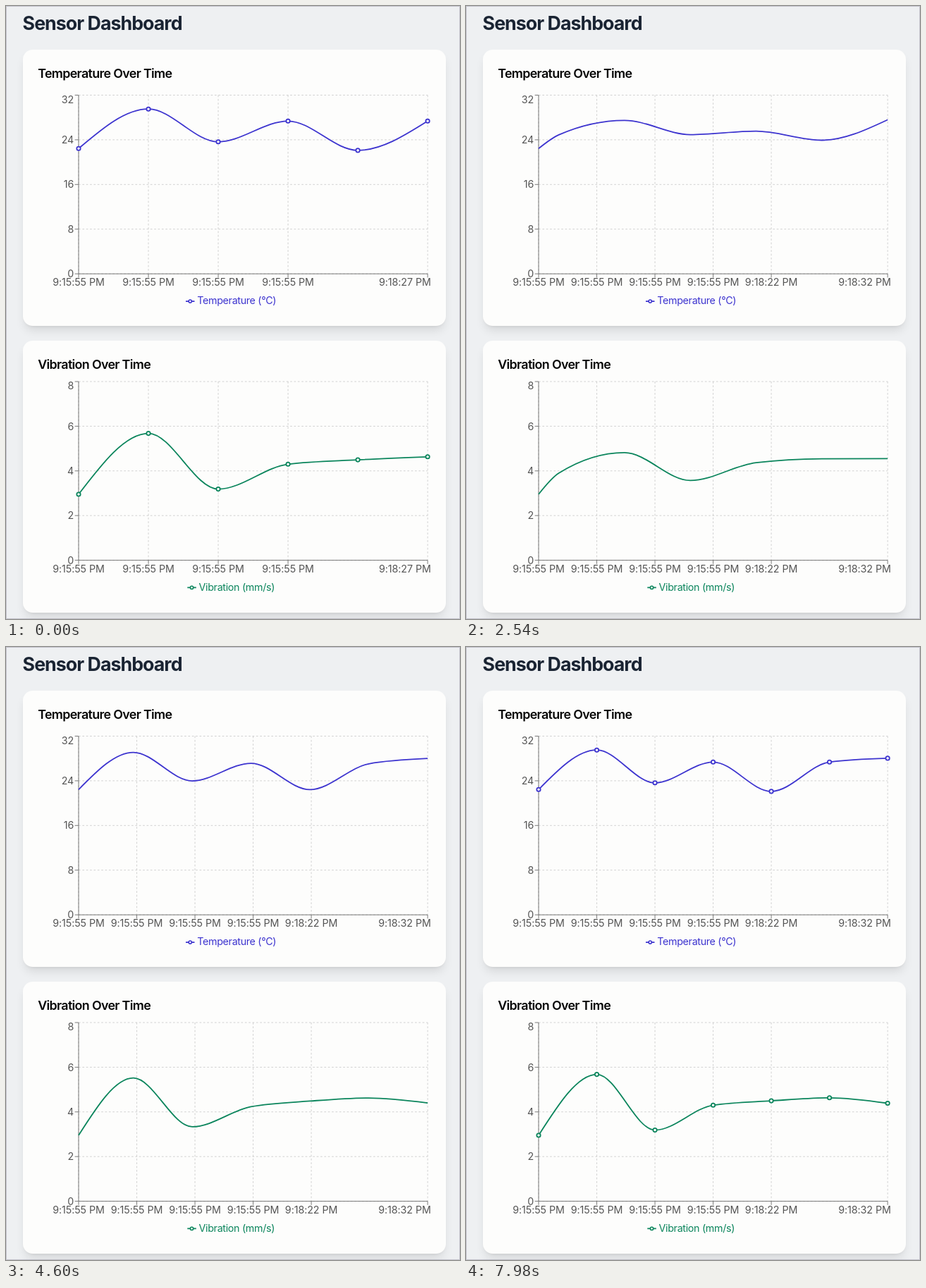
Animation of 644 by 870 pixels, one loop 8000 ms. Source, as an HTML page:

```html
<!DOCTYPE html>
<html lang="en">
<head>
<meta charset="utf-8">
<title>Sensor Dashboard</title>
<style>
html, body { margin: 0; width: 100%; height: 100%; overflow: hidden; background: #eef0f2; }
.card {
  position: absolute; left: 24px; width: 600px; border-radius: 14px; background: #fdfdfc;
  box-shadow: 0 9px 13.4px -2.7px rgba(0,0,0,.1), 0 3.6px 5.4px -3.6px rgba(0,0,0,.1);
}
.edge { position: absolute; left: 0; top: 0; width: 642px; height: 868px; border: 1px solid #c3c3cc; }
svg { position: absolute; left: 0; top: 0; }
text { font-family: Inter, "Open Sans", sans-serif; font-optical-sizing: none; }
.heading { font-size: 26.76px; font-weight: 700; letter-spacing: -.036em; fill: #1a2433; }
.title { font-size: 17.84px; font-weight: 600; letter-spacing: -.036em; fill: #050505; }
.label { font-size: 14.27px; letter-spacing: -.005em; fill: #555; }
.legend { font-size: 14.27px; letter-spacing: -.022em; }
.grid { stroke: #ccc; stroke-width: .9; stroke-dasharray: 2.68 2.68; }
.axis { stroke: #6b6b6b; stroke-width: .9; }
.curve { fill: none; stroke-width: 1.78; }
.dot { fill: #fff; stroke-width: 1.78; }
</style>
</head>
<body>
<div class="edge"></div>
<div class="card" style="top:62px;height:392px"></div>
<div class="card" style="top:475px;height:386px"></div>
<svg id="stage" width="644" height="870" viewBox="0 0 644 870"></svg>
<script>
const LOOP = 8000;
const LEFT = 103, RIGHT = 598.1, HEIGHT = 253.6;
const UPDATE_STEP = 36, TWEEN_STEPS = 90;

const BEFORE = { count: 6, times: ['9:15:55', '9:15:55', '9:15:55', '9:15:55', null, '9:18:27'] };
const AFTER = { count: 7, times: ['9:15:55', '9:15:55', '9:15:55', '9:15:55', '9:18:22', null, '9:18:32'] };

const CHARTS = [
  { title: 'Temperature Over Time', titleY: 101.5, top: 126.5, max: 32, color: '#3d34cf',
    legend: 'Temperature (°C)', legendX: 255, legendY: 423.3,
    ys: [202.3, 146.2, 192.8, 163.3, 204.9, 163.3, 157.9] },
  { title: 'Vibration Over Time', titleY: 514.8, top: 533, max: 8, color: '#0b855c',
    legend: 'Vibration (mm/s)', legendX: 257.3, legendY: 829.6,
    ys: [693, 606.6, 685.6, 650.3, 644.1, 639.8, 647.5] }
];

function add(parent, tag, attrs, content) {
  const el = document.createElementNS('http://www.w3.org/2000/svg', tag);
  for (const key in attrs) el.setAttribute(key, attrs[key]);
  if (content !== undefined) el.textContent = content;
  parent.appendChild(el);
  return el;
}

const line = (parent, cls, x1, y1, x2, y2) => add(parent, 'line', { class: cls, x1, y1, x2, y2 });
const label = (parent, x, y, anchor, content) =>
  add(parent, 'text', { class: 'label', x, y, 'text-anchor': anchor }, content);

const xAt = (i, count) => LEFT + (RIGHT - LEFT) * i / (count - 1);
const pointsFor = (ys, count) => ys.slice(0, count).map((y, i) => [xAt(i, count), y]);

// Monotone cubic interpolation through the points.
function curvePath(points) {
  const p = points.filter((q, i) => !i || q[0] - points[i - 1][0] > 1e-6);
  const last = p.length - 1;
  const width = i => p[i + 1][0] - p[i][0];
  const secant = i => (p[i + 1][1] - p[i][1]) / width(i);
  const m = p.map((_, i) => {
    if (i === 0 || i === last) return 0;
    const h0 = width(i - 1), h1 = width(i), s0 = secant(i - 1), s1 = secant(i);
    const mean = (s0 * h1 + s1 * h0) / (h0 + h1);
    return (Math.sign(s0) + Math.sign(s1)) * Math.min(Math.abs(s0), Math.abs(s1), Math.abs(mean) / 2);
  });
  m[0] = (3 * secant(0) - m[1]) / 2;
  m[last] = (3 * secant(last - 1) - m[last - 1]) / 2;
  let d = `M${p[0]}`;
  for (let i = 0; i < last; i++) {
    const [x0, y0] = p[i], [x1, y1] = p[i + 1], h = (x1 - x0) / 3;
    d += `C${x0 + h},${y0 + h * m[i]},${x1 - h},${y1 - h * m[i + 1]},${x1},${y1}`;
  }
  return d;
}

// cubic-bezier(.25, .1, .25, 1)
function ease(x) {
  if (x <= 0 || x >= 1) return Math.min(1, Math.max(0, x));
  let lo = 0, hi = 1;
  for (let i = 0; i < 30; i++) {
    const s = (lo + hi) / 2;
    if (.75 * s * (1 - s) + s ** 3 < x) lo = s; else hi = s;
  }
  return .3 * lo * (1 - lo) ** 2 + 3 * lo * lo * (1 - lo) + lo ** 3;
}

function addTimeAxis(parent, { count, times }, top) {
  const g = add(parent, 'g'), bottom = top + HEIGHT;
  times.forEach((time, i) => {
    if (!time) return;
    const x = xAt(i, count), end = i === count - 1;
    line(g, 'grid', x, top, x, bottom);
    line(g, 'axis', x, bottom, x, bottom + 5.35);
    label(g, end ? 602.8 : x, bottom + 17.2, end ? 'end' : 'middle', time + ' PM');
  });
  return g;
}

function addDots(parent, points, color) {
  const g = add(parent, 'g', { stroke: color });
  for (const [cx, cy] of points) add(g, 'circle', { class: 'dot', cx, cy, r: 2.68 });
  return g;
}

function addLegend(parent, { legend, legendX: x, legendY: y, color }) {
  const cy = y - 4.2;
  add(parent, 'path', {
    d: `M${x},${cy}h4.16m4.16,0h4.16M${x + 4.16},${cy}a2.08,2.08,0,1,1,4.16,0a2.08,2.08,0,1,1,-4.16,0`,
    fill: 'none', stroke: color, 'stroke-width': 1.56
  });
  add(parent, 'text', { class: 'legend', x: x + 16.2, y, fill: color }, legend);
}

function buildChart(chart) {
  const { title, titleY, top, max, color, ys } = chart;
  const bottom = top + HEIGHT;
  const g = add(stage, 'g');
  add(g, 'text', { class: 'title', x: 45.2, y: titleY }, title);
  for (let i = 0; i <= 4; i++) {
    const y = bottom - HEIGHT * i / 4;
    line(g, 'grid', LEFT, y, RIGHT, y);
    line(g, 'axis', LEFT - 5.35, y, LEFT, y);
    label(g, 96.2, y + (i === 4 ? 11.4 : 5.1), 'end', max * i / 4);
  }
  const axes = [BEFORE, AFTER].map(state => addTimeAxis(g, state, top));
  line(g, 'axis', LEFT, top, LEFT, bottom);
  line(g, 'axis', LEFT, bottom, RIGHT, bottom);
  const from = pointsFor(ys, BEFORE.count), to = pointsFor(ys, AFTER.count);
  const curve = add(g, 'path', { class: 'curve', stroke: color });
  const dots = [from, to].map(points => addDots(g, points, color));
  addLegend(g, chart);
  return { axes, dots, curve, from, to };
}

const show = (el, on) => el.setAttribute('visibility', on ? 'visible' : 'hidden');

function draw({ axes, dots, curve, from, to }, step) {
  const updated = step >= 0, done = step >= TWEEN_STEPS;
  show(axes[0], !updated);
  show(axes[1], updated);
  show(dots[0], !updated);
  show(dots[1], done);
  const k = ease(step / TWEEN_STEPS);
  const points = !updated ? from : to.map(([x, y], i) => {
    const [x0, y0] = from[Math.floor(i * from.length / to.length)];
    return [x0 + (x - x0) * k, y0 + (y - y0) * k];
  });
  curve.setAttribute('d', curvePath(points));
}

// Steps come in threes: two of 20 ms, then one of 100 ms.
function stepAt(time) {
  const t = time + 20, rest = t % 140;
  return Math.floor(t / 140) * 3 + Math.min(2, Math.floor(rest / 20));
}

const stage = document.getElementById('stage');
add(stage, 'text', { class: 'heading', x: 23.6, y: 34.4 }, 'Sensor Dashboard');
const charts = CHARTS.map(buildChart);
const start = performance.now();

function tick() {
  const step = stepAt((performance.now() - start) % LOOP) - UPDATE_STEP;
  for (const chart of charts) draw(chart, step);
  requestAnimationFrame(tick);
}
tick();
</script>
</body>
</html>
```
